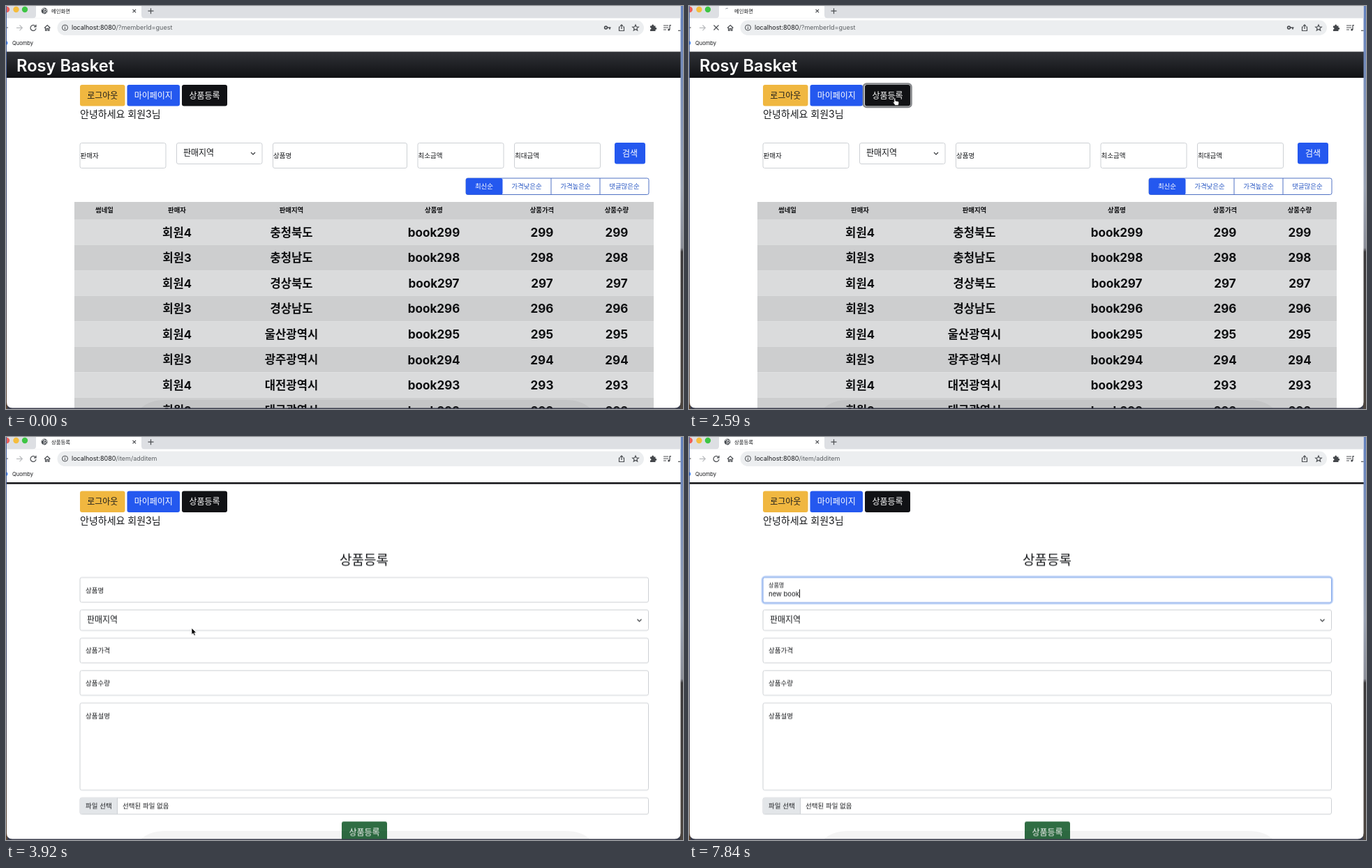
An HTML page for the animation above (8 s loop, 970x578 px).

```html
<!DOCTYPE html>
<html lang="ko">
<head>
<meta charset="utf-8">
<title>상품등록</title>
<style>
html, body { margin: 0; width: 100%; height: 100%; overflow: hidden; background: #fff; }
svg { display: block; width: 970px; height: 578px; }
svg, .entry { font-family: Inter, "Noto Sans CJK KR", "Noto Sans CJK", sans-serif; }
text { white-space: pre; }
.icon { fill: none; stroke: #4c4f53; stroke-width: 1.2; }
.field { fill: #fff; stroke: #cdd0d4; }
.entry { font-size: 9.5px; line-height: 16px; white-space: pre; color: #17191c; }
.caret { display: inline-block; width: .8px; height: 12.5px; vertical-align: -2.5px; background: #111; }
</style>
</head>
<body>
<svg id="stage" viewBox="0 0 970 578"></svg>
<script>
const LOOP = 8000, BLUE = '#2458ef', INK = '#17191c';
const css = [];

// Keyframes for every element of one class; stops are [ms, value].
function keys(name, prop, stops, ease = 'ease-in-out') {
  const all = [[0, stops[0][1]], ...stops, [LOOP, stops[stops.length - 1][1]]];
  const body = all.map(([t, v]) => `${(t / LOOP * 100).toFixed(3)}%{${prop}:${v}}`).join('');
  css.push(`@keyframes ${name}{${body}}.${name}{animation:${name} ${LOOP}ms ${ease} infinite}`);
}
// Hard on/off switching at the given times, starting hidden.
const toggle = (name, ...times) =>
  keys(name, 'opacity', [[0, 0], ...times.map((t, i) => [t, 1 - i % 2])], 'step-end');
const at = (x, y) => `translate(${x}px,${y}px)`;

const rect = (x, y, w, h, attrs = '') => `<rect x="${x}" y="${y}" width="${w}" height="${h}" ${attrs}/>`;
const path = (d, attrs = 'class="icon"') => `<path d="${d}" ${attrs}/>`;
const group = (name, ...parts) => `<g class="${name}">${parts.join('')}</g>`;
const place = (x, y, ...parts) => `<g transform="translate(${x} ${y})">${parts.join('')}</g>`;
const text = (x, y, size, str, attrs = '') =>
  `<text x="${x}" y="${(y + size * .37).toFixed(2)}" font-size="${size}" fill="${INK}" ${attrs}>${str}</text>`;
const mid = (x, y, size, str, attrs = '') => text(x, y, size, str, `text-anchor="middle" ${attrs}`);
const field = (x, y, w, h) => rect(x + .5, y + .5, w - 1, h - 1, 'rx="2.5" class="field"');
const button = (x, y, w, h, fill, label, color = '#fff') =>
  rect(x, y, w, h, `rx="3" fill="${fill}"`) +
  mid(x + w / 2, y + h / 2, 12, label, `font-weight="500" style="fill:${color}"`);
const chevron = (x, y) => path(`M${x - 3} ${y - 1.5}l3 3 3-3`, 'class="icon" style="stroke:#33363a"');

function desktop() {
  return `<defs>
    <linearGradient id="left" x2="0" y2="1"><stop stop-color="#4a67a8"/><stop offset=".55" stop-color="#40486a"/>
      <stop offset="1" stop-color="#5a4432"/></linearGradient>
    <linearGradient id="right" x2="0" y2="1"><stop stop-color="#6280bd"/><stop offset=".45" stop-color="#9aa3b4"/>
      <stop offset=".6" stop-color="#8a8d97"/><stop offset=".61" stop-color="#3c3a3c"/>
      <stop offset="1" stop-color="#4c453f"/></linearGradient>
    <linearGradient id="nav" x2="0" y2="1"><stop stop-color="#303237"/><stop offset="1" stop-color="#101114"/></linearGradient>
    <clipPath id="window"><path d="M1 0H966.5V568Q966.5 576.5 958 576.5H9Q1 576.5 1 568Z"/></clipPath>
    <clipPath id="view"><rect y="65" width="970" height="513"/></clipPath>
    <filter id="shadow" x="-10%" y="-10%" width="120%" height="125%">
      <feDropShadow dx="0" dy="2" stdDeviation="3.5" flood-opacity=".38"/></filter>
  </defs>` + rect(0, 0, 970, 578, 'fill="#3a3d4c"') + rect(0, 0, 2, 578, 'fill="url(#left)"') +
    rect(966, 0, 4, 578, 'fill="url(#right)"');
}

function chrome() {
  const light = (x, c) => `<circle cx="${x}" cy="5" r="4.2" fill="${c}"/>`;
  const url = (name, rest) => group(name,
    text(94, 31, 9, `localhost:8080<tspan fill="#5c6064">${rest}</tspan>`));
  const globe = '<circle cx="55" cy="7" r="4.4" fill="#4d5156"/>' +
    path('M52 5l2.5-1.5 1.5 1.5-2 1.5 1 2-1 2M57 4.5l1 2-1.5 1.5 1 1.5', 'fill="none" stroke="#fff" stroke-width="1"');
  return rect(0, 0, 970, 65, 'fill="#fff"') + rect(0, 0, 970, 17.5, 'fill="#dddfe3"') +
    path('M38 17.5Q43 17.5 43 13V0H194V13Q194 17.5 199 17.5Z', 'fill="#fff"') +
    light(1, '#ee5f57') + light(14.5, '#f5bd3c') + light(27, '#3dc544') +
    group('globe', globe) +
    group('busy', place(55, 7, group('spin', path('M-2.6-2.8A3.8 3.8 0 0 1 .8-3.7',
      'fill="none" stroke="#8d9298" stroke-width="1" transform="rotate(222)"')))) +
    group('home', text(65, 7, 7.3, '메인화면')) + group('add', text(65, 7, 7.3, '상품등록')) +
    path('M181.5 4.8l4.6 4.6m0-4.6l-4.6 4.6M203.5 7.2h8M207.5 3.2v8') +
    rect(73.5, 20.5, 840.5, 21.5, 'rx="10.75" fill="#eceef0"') +
    path('M-2 31H3') + path('M15 31.3h8M19.5 27.5l3.8 3.8-3.8 3.8', 'class="icon" style="stroke:#b8babd"') +
    group('globe', path('M42.2 29A4 4 0 1 0 43 32M43 26.8v3h-3')) +
    group('busy', path('M35.5 27.5l7 7m0-7l-7 7')) +
    path('M55 31.5l4.2-4 4.2 4M56.5 31v4.2h1.7v-2.8h2v2.8h1.7V31') +
    '<circle cx="84.5" cy="31" r="4" class="icon" style="stroke-width:1"/>' + path('M84.5 30.5v2.7M84.5 28.6v1') +
    url('home', '/?memberId=guest') + url('add', '/item/additem') +
    group('home', '<circle cx="859.5" cy="31" r="1.9" class="icon" style="stroke-width:1.6"/>' +
      path('M861.5 31h5M865 31v2.5', 'class="icon" style="stroke-width:1.7"')) +
    path('M880 30h-1.5v5.5h7V30H884M882 33v-6M880 28.8l2-2 2 2') +
    path('M902 27l1.2 2.8 3.1.3-2.4 2 .8 3-2.7-1.6-2.7 1.6.8-3-2.4-2 3.1-.3z') +
    path('M923 28.5h2.3q-.3-2 1.4-2t1.4 2h2.4v2.5q1.8-.2 1.8 1.4t-1.8 1.4v2.2h-7.5v-2.5q1.5 0 1.5-1.2t-1.5-1.2z', 'fill="#44474b"') +
    path('M942 28h7M942 31h7M942 34h4M951 27v7M951 27.6h2') +
    '<circle cx="949.7" cy="34" r="1.5" fill="#44474b"/>' +
    path('M963 35.3h4') + '<circle cx="-.5" cy="53" r="3" fill="#4285f4"/>' +
    text(9, 53, 7.5, 'Quomby');
}

function homePage() {
  const inputs = [[105.5, 124, '판매자'], [382, 193, '상품명'], [589.5, 124, '최소금액'], [728, 124, '최대금액']];
  const sorts = ['가격낮은순', '가격높은순', '댓글많은순'];
  const cols = [141, 245, 409, 613, 768, 875];
  const heads = ['썸네일', '판매자', '판매지역', '상품명', '상품가격', '상품수량'];
  const regions = ['충청북도', '충청남도', '경상북도', '경상남도', '울산광역시', '광주광역시', '대전광역시', '대구광역시'];
  const bold = 'font-weight="700" style="fill:#0d0e10"';
  const rows = regions.map((region, i) => {
    const y = 306 + i * 36.55, n = 299 - i;
    const cells = ['', i % 2 ? '회원3' : '회원4', region, 'book' + n, n, n];
    return rect(98, y, 830, 36.6, `fill="${i % 2 ? '#cdcecf' : '#dadbdc'}"`) +
      cells.map((c, k) => mid(cols[k], y + 18.5, k > 2 ? 17.1 : 16.6, c, bold)).join('');
  });
  return group('home',
    ...inputs.map(([x, w, label]) => field(x, 196, w, 37) + text(x + 1, 214.5, 9.5, label)),
    field(244, 196, 123.5, 31), text(254, 211, 12, '판매지역'), chevron(354, 211.5),
    button(872, 196, 44, 30.5, BLUE, '검색'),
    rect(659, 247, 262, 23.5, `rx="2.5" fill="#fff" stroke="#5072c4"`),
    rect(659, 247, 52.5, 23.5, `rx="2.5" fill="${BLUE}"`),
    path('M781 247v23.5M851 247v23.5', 'stroke="#5072c4"'),
    mid(685, 258.5, 9.5, '최신순', 'style="fill:#fff"'),
    ...sorts.map((s, i) => mid(746 + i * 70, 258.5, 9.5, s, 'style="fill:#2c5ac4"')),
    rect(98, 281, 830, 25, 'fill="#cdcecf"'),
    ...heads.map((h, i) => mid(cols[i], 293, 9.4, h, bold)),
    ...rows,
    group('pressed', rect(250, 111.5, 68.5, 33.5, 'rx="4.5" fill="none" stroke="#85878a" stroke-width="2.6"')));
}

function addPage() {
  const label = (y, str) => text(114, y, 9.5, str);
  const letters = [...'new book'].map((c, i) => `<span class="key${i}">${c}</span>`).join('');
  return group('add',
    mid(513, 211.5, 19, '상품등록'),
    field(105.5, 236.5, 815.5, 36.5),
    group('focus', rect(105.5, 236.5, 815.5, 37, 'rx="4" fill="none" stroke="#bdd2f7" stroke-width="4"'),
      rect(106, 237, 814.5, 36, 'rx="2.5" fill="#fff" stroke="#7fa5e8"')),
    place(114, 255, group('label', text(0, 0, 9.5, '상품명'))),
    field(105.5, 283, 815.5, 30.5), text(116, 298, 12, '판매지역'), chevron(907.5, 298.5),
    field(105.5, 323.5, 815.5, 36.5), label(341.5, '상품가격'),
    field(105.5, 370, 815.5, 36.5), label(388.5, '상품수량'),
    field(105.5, 416.5, 815.5, 126), label(435, '상품설명'),
    field(105.5, 552.5, 815.5, 24.5),
    rect(106.5, 553.5, 53, 22.5, 'fill="#e3e6e9"'), path('M159.5 553v23.5', 'stroke="#cdd0d4"'),
    text(114, 564.5, 9.5, '파일 선택'), text(167, 564.5, 9.5, '선택된 파일 없음'),
    button(481, 587, 65, 30.5, '#2f6d43', '상품등록'),
    `<foreignObject x="114" y="252.5" width="300" height="17"><div class="entry" xmlns="http://www.w3.org/1999/xhtml">${letters}<span class="caret blink"></span></div></foreignObject>`);
}

function page() {
  return `<g clip-path="url(#view)">` + rect(0, 65, 970, 513, 'fill="#fff"') + group('scroll',
    rect(0, 65.5, 970, 37.5, 'fill="url(#nav)"'),
    text(15, 85, 23.7, 'Rosy Basket', 'font-weight="600" style="fill:#fff"'),
    button(106, 113, 64.5, 30.5, '#f0b740', '로그아웃', INK),
    button(173.5, 113, 75.5, 30.5, BLUE, '마이페이지'),
    button(252, 113, 65, 30.5, '#111215', '상품등록'),
    text(106, 155, 14, '안녕하세요 회원3님'),
    homePage(), addPage()) +
    path('M192 578Q205 565 228 565H802Q825 565 838 578Z', 'fill="#000" opacity=".045"') + '</g>';
}

function dialog() {
  const cord = (d, c) => path(d, `fill="none" stroke="${c}" stroke-width="3.2"`);
  const star = (x, y, r, c, w) => [0, 60, 120].map(a =>
    `<path d="M0 ${-r}V${r}" stroke="${c}" stroke-width="${w}" transform="translate(${x} ${y}) rotate(${a})"/>`).join('');
  return group('dialog',
    rect(372.5, 42.5, 282, 179.5, 'rx="3" fill="#fff" filter="url(#shadow)"'),
    cord('M373 86Q386 83 397 92', '#dcdee1'), cord('M397 92Q416 106 430 96', '#b9bcc0'),
    cord('M533 81Q535 67 553 65', '#b9bcc0'), cord('M553 65Q577 64 577 44', '#dcdee1'),
    star(405.5, 76.5, 6, '#dcdee1', 2.2),
    path('M629 86a5.7 5.7 0 0 1 11.5 0z', 'fill="#dfe1e4"'),
    path('M430 104H541', 'stroke="#dcdee1"'),
    rect(483, 61.5, 50, 41, 'rx="2" fill="#edeff2" stroke="#d5d8dc"'),
    rect(443, 53.5, 43, 57.5, 'rx="3" fill="#f8f9fa" stroke="#d5d8dc"'),
    '<circle cx="464" cy="53" r="4" fill="#fff" stroke="#d5d8dc"/>',
    rect(450, 55.5, 28.5, 8, 'rx="1.5" fill="#e6e8eb" stroke="#d5d8dc"'),
    rect(474, 77.5, 41.5, 16, 'rx="1.5" fill="#fff" stroke="#d5d8dc"'),
    star(483.5, 85.5, 3, '#3c6fd6', 1.3), star(492, 85.5, 3, '#3c6fd6', 1.3), star(500.5, 85.5, 3, '#3c6fd6', 1.3),
    path('M508.5 81.5v8', 'stroke="#3c6fd6" stroke-width="1.3"'),
    path('M464.5 71L479.5 95H450Z', 'fill="#cf4630" stroke="#cf4630" stroke-linejoin="round"'),
    path('M464.5 79.5v7M464.5 88.5v2.2', 'stroke="#fff" stroke-width="2"'),
    text(382.5, 134, 8.9, '비밀번호 변경', 'font-weight="500"'),
    text(382.5, 157.5, 7.15, '방금 사용한 비밀번호가 정보 유출로 인해 노출된 것으로 확인됩니다. 지금 바로 비밀번호', 'style="fill:#4a4d51"'),
    text(382.5, 170, 7.15, '를 변경하는 것이 좋습니다.', 'style="fill:#4a4d51"'),
    '<circle cx="390" cy="202" r="4" class="icon" style="stroke-width:.9"/>', path('M390 201.3v3M390 199.4v1'),
    rect(604, 192, 40, 20, 'rx="2" fill="#2859d3"'),
    mid(624, 202, 7.5, '확인', 'font-weight="500" style="fill:#fff"'));
}

function pointer() {
  return group('mouse',
    group('arrow', path('M0 0V9.4L2.2 7.4 3.7 10.9 5.3 10.2 3.8 6.8H6.8Z', 'fill="#000" stroke="#fff" stroke-width=".7"')),
    group('hand', path('M-.2 1q0-1 1-1t1 1V4l3.6.8q1.4.3 1.4 1.6 0 2.2-1.1 4.1H1.3Q0 8.3-1.5 6.7q-.7-1 .2-1.2.6 0 1.1.7z',
      'fill="#fff" stroke="#111" stroke-width=".7"')),
    group('beam', path('M-2.5-7.5Q0-7.5 0-5.5V5.5Q0 7.5-2.5 7.5M2.5-7.5Q0-7.5 0-5.5M0 5.5Q0 7.5 2.5 7.5M-1.2 2.5h2.4',
      'fill="none" stroke="#222" stroke-width="1"')));
}

toggle('home', 0, 2730);
toggle('add', 2730);
toggle('globe', 0, 2450, 2800);
toggle('busy', 2450, 2800);
toggle('pressed', 2450);
toggle('arrow', 910, 2240, 3080, 4410);
toggle('hand', 2240, 3080);
toggle('beam', 4410, 6020);
toggle('blink', 4620, 5140, 5670);
keys('dialog', 'opacity', [[420, 0], [560, 1], [1400, 1], [1540, 0]]);
keys('scroll', 'transform', [[3500, at(0, 0)], [3910, at(0, -35.5)]]);
keys('focus', 'opacity', [[4620, 0], [4770, 1]]);
keys('label', 'transform', [[4620, 'translateY(0) scale(1)'], [4720, 'translateY(-7px) scale(.85)']]);
keys('mouse', 'transform', [
  [910, at(560, 386)], [1190, at(620, 193)], [1470, at(620, 193)], [2300, at(294, 132)],
  [3010, at(294, 132)], [3360, at(266, 274)], [4060, at(266, 274)], [4480, at(287, 220)]]);
[6020, 6370, 6510, 6650, 7210, 7490, 7700, 7840].forEach((t, i) =>
  keys('key' + i, 'font-size', [[0, 0], [t, '9.5px']], 'step-end'));
css.push(`.label{opacity:1}@keyframes spin{to{transform:rotate(-360deg)}}.spin{animation:spin 1600ms linear infinite}`);

document.getElementById('stage').innerHTML =
  desktop() + `<g clip-path="url(#window)">${chrome()}${page()}</g>` + dialog() + pointer();
document.head.appendChild(document.createElement('style')).textContent = css.join('\n');
</script>
</body>
</html>
```
